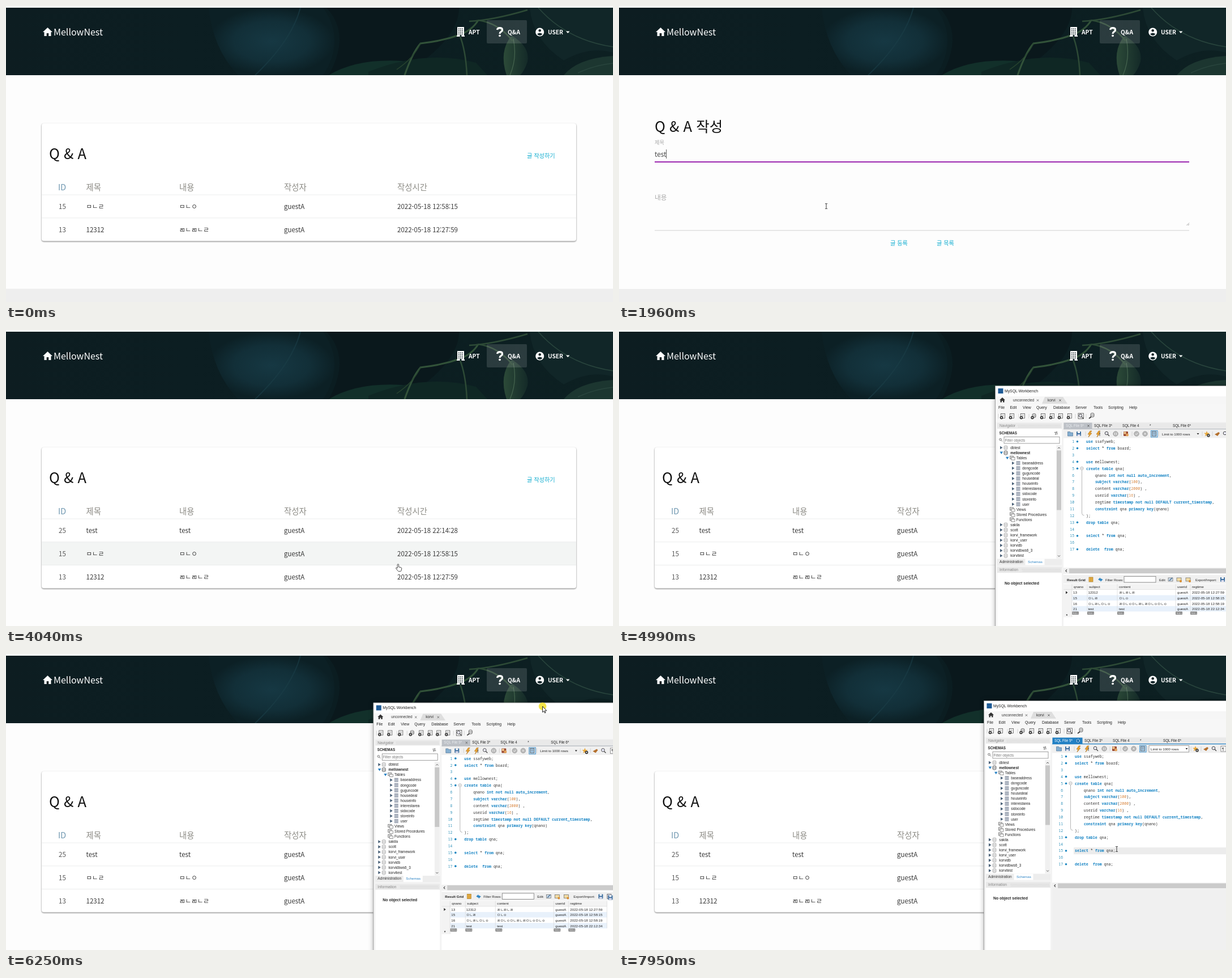
Write an HTML page that moves like this. It is 1072x522 px and loops after 8000 ms.

```html
<!DOCTYPE html>
<html lang="ko">
<head>
<meta charset="utf-8">
<title>Q &amp; A</title>
<style>
html, body { margin: 0; height: 100%; overflow: hidden; background: #fdfdfd; }
svg { display: block; width: 1072px; height: 522px; }
text { white-space: pre; font-family: "Noto Sans CJK KR", "Noto Sans CJK JP", "Noto Sans", sans-serif; }
#win text { font-family: "Liberation Sans", "Noto Sans CJK KR", sans-serif; }
#win .code { font-family: "Noto Sans Mono", "DejaVu Sans Mono", monospace; }
.code .k { fill: #1684c4; font-weight: 700; }
.code .n { fill: #d8843c; }
.m { font-weight: 500; }
.b { font-weight: 700; }
.card { filter: drop-shadow(0 1px 1.3px #0008); }
.frame { filter: drop-shadow(0 0 4px #0005); }
</style>
</head>
<body>
<svg id="stage" viewBox="0 0 1072 522"></svg>
<script>
const text = (x, y, str, size, fill = '#333', cls = '', more = '') =>
  `<text x="${x}" y="${y}" font-size="${size}" fill="${fill}" class="${cls}" ${more}>${str}</text>`;
const rect = (x, y, w, h, fill, more = '') =>
  `<rect x="${x}" y="${y}" width="${w}" height="${h}" fill="${fill}" ${more}/>`;
const path = (d, fill, more = '') => `<path d="${d}" fill="${fill}" ${more}/>`;
const line = (d, color, width = 1, more = '') => path(d, 'none', `stroke="${color}" stroke-width="${width}" ${more}`);
const disc = (x, y, r, fill, more = '') => `<circle cx="${x}" cy="${y}" r="${r}" fill="${fill}" ${more}/>`;
const group = (id, body) => `<g id="${id}">${body}</g>`;
const each = (list, fn) => list.map(fn).join('');

const USER = 'guestA';
const CYAN = '#14aed0';

/* ---------- page header ---------- */
const header = () => `
  <defs>
    <linearGradient id="dark"><stop stop-color="#0d1d21"/><stop offset=".3" stop-color="#0c1e22"/>
      <stop offset=".55" stop-color="#0b1d21"/><stop offset="1" stop-color="#0d2022"/></linearGradient>
    <radialGradient id="leaf"><stop stop-color="#163843"/><stop offset=".6" stop-color="#122f38"/>
      <stop offset="1" stop-color="#0c2025"/></radialGradient>
    <linearGradient id="blade" x2="1"><stop stop-color="#2c4a38"/><stop offset="1" stop-color="#142a28"/></linearGradient>
    <clipPath id="banner"><rect y="3" width="1072" height="119"/></clipPath>
  </defs>` +
  rect(0, 0, 1072, 3, '#f9fdfa') + rect(0, 3, 1072, 119, 'url(#dark)') +
  '<g clip-path="url(#banner)">' +
  path('M358 3Q365 75 410 122H560Q600 60 560 3Z', 'url(#leaf)') +
  line('M520 3Q505 60 440 122', '#1b3e48', 2, 'opacity=".6"') +
  path('M566 3Q610 50 570 122H700Q800 60 800 3Z', '#0a181c') +
  path('M570 122Q620 92 700 97L760 122Z', '#12302a') +
  path('M640 116Q740 76 830 100L850 122H640Z', '#0f2724') +
  path('M925 3Q930 60 985 96Q1030 70 1072 82V3Z', '#112628') +
  path('M985 122Q1010 92 1072 88V122Z', '#1c3630') +
  line('M940 3Q990 60 1072 72M1010 118Q1040 104 1072 101', '#29453d', 1.5) +
  path('M884 122Q870 80 893 52Q926 72 921 98Q916 114 908 122Z', 'url(#blade)') +
  line('M890 122Q903 92 896 58', '#476650', 1.2) +
  line('M704 122Q718 82 732 66Q770 62 801 51Q824 42 834 25', '#325239', 3) +
  line('M801 51Q812 78 814 122M818 27Q860 25 921 7M834 25Q870 30 895 62', '#2d4a36', 2.5) +
  line('M690 112Q720 92 732 66', '#28442f', 1.5) +
  '</g>' +
  rect(849, 25, 71, 41, '#fff', 'rx="2" opacity=".13"') +
  path('M73.500 38L65 46H67.500V53H71.700V48H75.300V53H79.500V46H82Z', '#fff') +
  text(84, 52, 'MellowNest', 16, '#fff') +
  path('M796 54V52H797V37H809V52H810V54Z', '#fff') +
  each([0, 1, 2, 3], r => each([799, 802, 805], x => rect(x, 39.5 + r * 3, 1.6, 1.6, '#14262a'))) +
  rect(801.500, 51, 3, 3, '#14262a') +
  line('M867.500 42Q868 38.600 872 38.600Q876.500 38.600 876.500 42Q876.500 44.200 874 45.600Q872 46.800 872 49', '#fff', 3.2) +
  disc(872, 52.300, 1.900, '#fff') +
  disc(942.700, 46, 7.500, '#fff') + disc(942.700, 43.300, 2.300, '#14262a') +
  path('M938 49.500Q942.700 45.500 947.400 49.500Q942.700 54.500 938 49.500Z', '#14262a') +
  text(817, 50, 'APT', 10.2, '#fff', 'b') + text(886, 50, 'Q&amp;A', 10.2, '#fff', 'b') +
  text(957, 50, 'USER', 10.2, '#fff', 'b') + path('M989 44.500H995.500L992.200 48Z', '#fff');

/* ---------- list page ---------- */
const COLS = [93, 141.5, 306, 491, 691];
const ROWS = [
  [25, 'test', 'test', USER, '2022-05-18 22:14:28'],
  [15, 'ㅁㄴㄹ', 'ㅁㄴㅇ', USER, '2022-05-18 12:58:15'],
  [13, '12312', 'ㄻㄴㄻㄴㄹ', USER, '2022-05-18 12:27:59']];
const rowY = i => 333 + 40.8 * i;

const list = (id, rows) => group(id,
  rect(0, rowY(rows.length) + 84, 1072, 130, '#eee') +
  rect(63, 207, 944, rowY(rows.length) - 207, '#fff', 'rx="4" class="card"') +
  rect(63, 0, 944, 40.8, '#f3f5f4', `id="${id}Hover"`) +
  text(76, 270, 'Q &amp; A', 25.5, '#111') + text(920, 267.5, '글 작성하기', 10.2, CYAN, 'm') +
  each(['ID', '제목', '내용', '작성자', '작성시간'], (s, i) =>
    text(COLS[i] - (i ? 0 : 1), 324.5, s, 14.4, i ? '#8c8b85' : '#6f97b0', '', 'font-weight="300"')) +
  each(rows, (r, i) => rect(63, rowY(i) - .5, 944, 1, '#ebeded') +
    each(r, (s, c) => text(COLS[c], rowY(i) + 25.3, s, 11.5, c ? '#383838' : '#555', '', 'font-weight="300"'))));

/* ---------- form page ---------- */
const form = () => group('form',
  text(63, 222, 'Q &amp; A 작성', 25.5, '#111') +
  text(63, 265, '제목', 11.7, '#aaa', '', 'id="label0"') + text(63, 265.5, '', 11.7, '#444', '', 'id="value0"') +
  rect(63, 274.8, 944, 1, '#cfcfcf') + rect(0, 274, 0, 2, '#9c27b0', 'id="bar0"') +
  text(63, 341.5, '내용', 11.7, '#aaa', '', 'id="label1"') + text(77, 344.5, '', 11.7, '#444', '', 'id="value1"') +
  group('lower', rect(0, 499, 1072, 60, '#eee') + rect(63, 395.3, 944, 1, '#d2d2d2') +
    rect(0, 394.8, 0, 2, '#4caf50', 'id="bar1"') +
    line('M1002.500 387L1007 382.500M1005 387L1007 385', '#888', .8) +
    text(479, 421.5, '글 등록', 10.2, CYAN, 'm') + text(561, 421.5, '글 목록', 10.2, CYAN, 'm')) +
  rect(0, 0, .8, 16, '#333', 'id="caret"'));

/* ---------- database window ---------- */
const BLUE = '#2a82c4';
const paper = (x, y, fill = '#fff') => rect(x - 3.5, y - 4.5, 7, 8, fill, 'stroke="#555" stroke-width=".8"') +
  line(`M${x - 2} ${y - 2}h4m-4 2h4`, '#888', .7);
const badge = (x, y) => disc(x, y, 2.700, '#222') + line(`M${x - 1.6} ${y}h3.200m-1.600-1.600v3.200`, '#fff', .8);
const lens = (x, y) => disc(x - 1, y - 1, 2.800, '#eef', 'stroke="#444"') + line(`M${x + 1} ${y + 1}l3 3`, '#444', 1.3);
const cross = (x, y) => line(`M${x - 1.7} ${y - 1.7}l3.400 3.400m0-3.400l-3.400 3.400`, '#555', .8);
const bolt = (x, y) => path(`M${x + 1} ${y - 5}l-4 6h3l-2 5 6-7h-3l3-4z`, '#f0a52a', 'stroke="#a66a18" stroke-width=".6"');
const drum = (x, y, c) => rect(x - 3, y - 3.5, 6, 7, '#eee', `rx="2" stroke="${c}" stroke-width=".8"`) +
  line(`M${x - 3} ${y - 1}h6m-6 2.300h6`, c, .6);
const floppy = (x, y) => rect(x - 4, y - 4, 8, 8, '#3e6f9f', 'rx="1"') + rect(x - 2, y - 4, 4, 3, '#fff') + rect(x - 2.5, y + 1, 5, 3, '#dde');
const header2 = (y, s) => rect(648, y, 114, 10, '#e9e9e9') +
  line(`M${652 + s.length * 3.6} ${y + 4}H760m0 3H${652 + s.length * 3.6}`, '#c6c6c6', 1, 'stroke-dasharray="1 1"') +
  text(652, y + 7.3, s, 6.6, '#888');

// depth, name, state: 1 closed, 2 open
const TREE = [[0, 'dbtest', 1], [0, 'mellownest', 2], [1, 'Tables', 2],
  ...'baseaddress dongcode guguncode housedeal houseinfo interestarea sidocode storeinfo user'.split(' ').map(s => [2, s, 1]),
  ...['Views', 'Stored Procedures', 'Functions'].map(s => [1, s, 0]),
  ...'sakila scott korvi_framework korvi_user korvidb korvidbws6_3 korvitest'.split(' ').map(s => [0, s, 1])];

const tree = () => each(TREE, ([depth, name, state], i) => {
  const x = 655 + depth * 10.5, y = 191.5 + i * 9.07;
  const icon = depth == 0 ? drum(x + 8, y, name == 'mellownest' ? '#555' : '#aaa') :
    depth == 1 ? rect(x + 5, y - 3.5, 6, 5, '#ddd', 'stroke="#666" stroke-width=".7"') + rect(x + 7.5, y - 1, 6, 4.5, '#fff', 'stroke="#666" stroke-width=".7"') :
    rect(x + 5.5, y - 3.5, 7, 7, '#9aa2b0') + line(`M${x + 5.5} ${y - 1}h7m-7 2.300h7`, '#e4e8ee', .7);
  const arrow = state == 1 ? path(`M${x - 2} ${y - 2.800}v5.600l4.500-2.800z`, '#4a6178') :
    state ? path(`M${x - 2.500} ${y - 2}h5.600l-2.800 4.500z`, BLUE) : '';
  return arrow + icon + text(x + 16.3, y + 2.3, name, 6.4, '#222', name == 'mellownest' ? 'b' : '');
});

const CODE = ['use ssafyweb;', 'select * from board;', '', 'use mellownest;', 'create table qna(',
  '    qnano int not null auto_increment,', '    subject varchar(100),', '    content varchar(2000) ,',
  '    userid varchar(16) ,', '    regtime timestamp not null DEFAULT current_timestamp,',
  '    constraint qna primary key(qnano)', ');', 'drop table qna;', '', 'select * from qna;', '', 'delete  from qna;'];
const KEYS = /\b(use|select|from|create|table|int|not|null|auto_increment|subject|varchar|timestamp|DEFAULT|current_timestamp|constraint|primary|key|drop|delete)\b|\d+/g;
const paint = s => s.replace(KEYS, m => `<tspan class="${/\d/.test(m) ? 'n' : 'k'}">${m}</tspan>`);
const code = () => each(CODE, (s, i) => {
  const y = 183.2 + i * 11.875;
  return text(784, y, i + 1, 6.4, '#2b8fb8', 'code', 'text-anchor="end"') + text(805, y, paint(s), 6.62, '#333', 'code') +
    (/^[a-z]/.test(s) ? disc(789.5, y - 2.5, 1.8, '#1a86c0') : '');
});

const GRID = [783, 810, 863, 966, 992];
const DATA = [
  ['13', '12312', 'ㄻㄴㄻㄴㄻ', USER, '2022-05-18 12:27:59'],
  ['15', 'ㅁㄴㄻ', 'ㅁㄴㅇ', USER, '2022-05-18 12:58:15'],
  ['16', 'ㅁㄴㄻㄴㅁㄴㅇ', 'ㄻㅁㄴㅇㅁㄴㄻㄴㄻㅁㄴㅇㅁㄴㅇ', USER, '2022-05-18 12:58:19'],
  ['21', 'test', 'test', USER, '2022-05-18 22:12:34']];
const results = () => group('results',
  rect(765, 414, 400, 200, '#fff') + rect(765, 416, 400, 15, '#f0f0f0') +
  text(771, 426.5, 'Result Grid', 6.1, '#222', 'b') + rect(810, 420, 7, 8, '#f4b84a', 'stroke="#a77a22" stroke-width=".7"') +
  line('M812.500 420v8m2.500-8v8', '#a77a22', .7) +
  path('M826 424l4-3.500v2h2v2h-2v2zM834.500 424l-4 4v-2h-1v-2h1v-2z', '#3388c4') +
  text(839, 426.5, 'Filter Rows:', 6, '#222') + rect(872, 418.5, 56, 10.5, '#fff', 'stroke="#777" stroke-width=".8"') +
  text(934, 426.5, 'Edit:', 6, '#222') +
  each([954, 969, 985], (x, i) => rect(x - 4, 421, 8, 6, i ? '#f2dca4' : '#cfdfed', 'stroke="#666" stroke-width=".7"') +
    (i ? disc(x + 3, 427, 2, '#d98b2b') : line(`M${x - 2} 426l5-5`, '#4a6f94', 1.4))) +
  text(998, 426.5, 'Export/Import:', 6, '#222') + floppy(1046, 424) + paper(1061, 424.5, '#dde') + floppy(1063, 426) +
  rect(765, 432, 292, 9.5, '#f3f3f3') + rect(765, 441.5, 15, 49, '#f3f3f3') +
  each(['qnano', 'subject', 'content', 'userid', 'regtime'], (s, i) => text(GRID[i], 439, s, 6.2, '#222')) +
  each(DATA, (r, i) => (i % 2 ? rect(780, 442 + i * 9.6, 277, 9.6, '#e8f1fb') : '') +
    each(r, (s, c) => text(GRID[c] - (c == 0 ? 1 : c == 1 ? 1.5 : 0), 449.3 + i * 9.6, s, 6.15, '#222'))) +
  each(GRID, x => rect(x - 3, 480.5, 12, 5.5, '#858585', 'rx="1"') + text(x - 1.5, 485, 'NULL', 4, '#fff')) +
  line('M765 441.500H1057M780 432V490M807 432V480M860 432V480M963 432V480M989 432V480M1057 432V480', '#d8d8d8', .7) +
  path('M769 444.500v5l3.500-2.500z', '#333') + text(769.5, 490, '*', 7, '#333', 'b'));

const win = () => group('win',
  rect(644.5, 82.5, 500, 500, '#f3f3f3', 'class="frame"') + rect(645, 83, 500, 31, '#fff') +
  rect(649.5, 87, 9, 9, '#1f5b96') + text(661, 94, 'MySQL Workbench', 6.85, '#222') +
  rect(645, 101, 500, 13, '#f6f6f6') + path('M727 114L732 102H764L772 114Z', '#dedede') +
  path('M657 103L652 107.500H653.500V111.500H656V109H658V111.500H660.500V107.500H662Z', '#333') +
  text(676, 110, 'unconnected', 6.5) + cross(719.5, 108) + text(737, 110, 'korvi', 6.5) + cross(759, 108) +
  rect(645, 114, 500, 32, '#f7f7f7') +
  each([['File', 650], ['Edit', 670.5], ['View', 693], ['Query', 717], ['Database', 747], ['Server', 786], ['Tools', 818],
    ['Scripting', 844], ['Help', 881]], ([s, x]) => text(x, 122.8, s, 6.9, '#222')) +
  each([658, 674, 693, 729, 745, 760, 776], x => paper(x, 136) + badge(x - 2.5, 138.5)) + drum(713, 135, '#555') + badge(710, 138.5) +
  rect(791, 131, 9.5, 9.5, '#fff', 'stroke="#444" stroke-width=".8"') + lens(796, 136) +
  drum(816, 134, '#555') + line('M810 140l4-3', '#333', 1.6) +
  line('M650 132v8M686 132v8M704 132v8M786 132v8M805 132v8', '#ccc', .8) +
  // sidebar
  rect(648, 148, 114, 240, '#fff') + header2(148, 'Navigator') + text(651.5, 168, 'SCHEMAS', 6.3, '#222', 'b') +
  line('M749 164.500h5l-1.500-1.500M755 167h-5l1.500 1.500', '#444', .9) + disc(653.5, 177, 1.800, 'none', 'stroke="#555" stroke-width=".8"') +
  line('M655 178.500l2 2', '#555', .9) + rect(660, 172.5, 98, 11.5, '#fff', 'stroke="#888" stroke-width=".8"') +
  text(661.5, 180.500, 'Filter objects', 6.3, '#777') + tree() +
  rect(752.5, 187, 9, 200, '#f0f0f0') + rect(753, 196.5, 8, 105, '#c8c8c8') +
  line('M755 193l2-2 2 2M755 381.500l2 2 2-2', '#555', 1) +
  rect(648, 387.5, 114, 11, '#ededed') + rect(697.5, 387.5, 34, 11, '#fff') +
  text(652, 394.8, 'Administration', 6.6, '#333') + text(702, 394.8, 'Schemas', 6.2, BLUE) +
  header2(402, 'Information') + rect(648, 412.5, 114, 200, '#fff') + text(661, 433, 'No object selected', 6.9, '#222', 'b') +
  // editor
  rect(765, 147.5, 400, 11, '#e9e9e9') + rect(765.5, 147.5, 50, 11, '#bcc0c6', 'id="tab"') + rect(765, 158, 400, 1.5, '#bcc0c6', 'id="rule"') +
  text(769, 155, 'SQL File 9*', 6.3, '#e8eaee', '', 'id="tabName"') + cross(809, 153) +
  group('tabs', each([['SQL File 3*', 819], ['SQL File 4', 869], ['*', 917], ['SQL File 6*', 958]], ([s, x]) => text(x, 155, s, 6.3, '#222'))) +
  group('busy', disc(810.7, 153, 4.500, '#1b6fb0') + disc(810.7, 153, 2.800, 'none', 'stroke="#b9dcf4" stroke-width="1.3" stroke-dasharray="2 1"')) +
  rect(765, 159.5, 400, 15, '#f0f0f0') +
  path('M772.500 163.500h4l1 1.500h4v6h-9z', '#84aed0', 'stroke="#54789a" stroke-width=".7"') + floppy(792, 167) +
  bolt(811, 167) + bolt(826, 167) + line('M829 164v7', '#555') + lens(842, 167) +
  each([857, 894, 909], x => disc(x, 167, 4.300, '#b8b8b8', 'stroke="#999" stroke-width=".7"')) +
  line('M855.500 165v4m3-4v4M892 167l1.500 1.800 2.800-3.500M907.500 165.500l3 3m0-3l-3 3', '#eee', 1) +
  rect(871, 163, 8, 8, '#9a4a34', 'rx="1"') + disc(873.5, 165.5, 2.200, '#f0c890') + disc(877.5, 169, 2.500, '#e2a15c') +
  rect(919.500, 161.500, 11.5, 11.5, '#cfe6f7', 'stroke="#3a8ac4" stroke-width=".9"') + paper(925, 167.5, '#9cc4e4') +
  rect(936, 161.5, 70.5, 11.5, '#fff', 'id="limit" stroke-width=".8"') + text(939, 169.5, 'Limit to 1000 rows', 6.1, '#222') +
  path('M1000.500 166h4l-2 2.500z', '#222') +
  path('M1018 162l1.300 3.500 3.700.2-3 2.300 1.200 3.600-3.200-2.100-3.200 2.100 1.200-3.600-3-2.300 3.700-.2z', '#e8a83a') + badge(1021, 170) +
  path('M1032 168l7-4 2 2-4 5z', '#b4702e') + lens(1051, 167) + rect(1063, 162.5, 9, 9.5, '#fff', 'stroke="#777" stroke-width=".8"') + text(1065, 170, '¶', 7, '#333') +
  line('M804 163v8M867 163v8M886 163v8M933 163v8M1010 163v8M1028 163v8', '#ccc', .8) +
  rect(765, 174.5, 400, 229, '#fff') + rect(803, 341.2, 400, 12, '#ececec', 'id="band"') + code() +
  disc(797.5, 228, 2.700, '#fff', 'stroke="#999" stroke-width=".7"') +
  line('M796 228h3M797.500 231V307Q797.500 311 801.500 311', '#999', .7) + rect(876, 341.5, .9, 11.5, '#222', 'id="ibar"') +
  rect(765, 403.5, 400, 10.5, '#f0f0f0') + rect(775, 404.5, 400, 8.5, '#cbcbcb') + line('M771 406.500l-2.200 2.200 2.200 2.200', '#444', 1.1) +
  rect(765, 414, 400, 200, '#f0f0f0') + results() + line('M644.500 600V82.500H1145', '#8f8f8f', .8));

/* ---------- pointer ---------- */
const pointer = () => group('pointer', disc(0, 0, 6.800, '#f2e02a', 'id="halo" opacity=".85"') +
  path('M0 0V10.500L2.400 8.300 4 11.800 5.500 11.100 4 7.700H7.300Z', '#fff', 'id="arrow" stroke="#111" stroke-width=".9"') +
  path('M-1.200 1.200Q-1.200 0 0 0 1.200 0 1.200 1.200V5l3.800.8q1.600.5 1.400 2l-.8 3.500q-.3 1.500-1.500 1.500H1.200q-1 0-1.800-1.200L-3.600 7.600q-.6-1 .4-1.400.8-.2 2 1z',
    '#fff', 'id="hand" stroke="#333" stroke-width=".9"') +
  line('M-2-4.500h1.300l.7.600.7-.6H2M0-4V4M-2 4.500h1.300l.7-.6.7.6H2', '#222', .9, 'id="beam"'));

const stage = document.getElementById('stage');
stage.innerHTML = header() + list('before', ROWS.slice(1)) + list('after', ROWS) + form() + win() + pointer();

const el = {};
stage.querySelectorAll('[id]').forEach(e => el[e.id] = e);
const set = (id, attrs) => { for (const k in attrs) el[id].setAttribute(k, attrs[k]); };
const show = (id, on) => set(id, { display: on ? 'inline' : 'none' });
const move = (id, x, y) => set(id, { transform: `translate(${x} ${y})` });
const ramp = (t, from, ms) => { const p = Math.min(1, Math.max(0, (t - from) / ms)); return p * p * (3 - 2 * p); };

// time, x, y of the pointer tip
const TRACK = [[0, 1090, 330], [110, 1090, 330], [120, 1036, 318], [400, 950, 268], [910, 946, 266], [1200, 420, 262],
  [1500, 400, 270], [1750, 372, 335], [1960, 366, 353], [2380, 366, 353], [2790, 519, 446], [2930, 521, 448], [3100, 505, 438],
  [3420, 503, 437], [3830, 660, 425], [4040, 692, 413], [4300, 800, 390], [4520, 1002, 322], [4590, 1100, 300],
  [5120, 1100, 118], [5190, 1060, 118], [5260, 1030, 118], [5400, 1030, 118], [5800, 961, 104], [6110, 961, 103],
  [6320, 941, 87], [6400, 941, 90], [6730, 907, 311], [6940, 888, 336], [7140, 879, 344], [8000, 879, 344]];
const tip = t => {
  const i = TRACK.findIndex(k => k[0] > t), a = TRACK[i - 1], b = TRACK[i], p = (t - a[0]) / (b[0] - a[0]);
  return [a[1] + (b[1] - a[1]) * p, a[2] + (b[2] - a[2]) * p];
};

const FOCUS = [1200, 2170];
const TYPED = [[1470, 1590, 1680, 1820], [2310, 2400, 2500, 2650]];
const LABEL = [[265, 244], [341.5, 325]];

function drawForm(t) {
  const grow = t >= FOCUS[1] ? 16.5 : 0;
  move('lower', 0, grow);
  FOCUS.forEach((at, i) => {
    const p = ramp(t, at, 200), active = i || t < FOCUS[1] ? p : 1 - ramp(t, FOCUS[1], 200);
    set('label' + i, { y: LABEL[i][0] + (LABEL[i][1] - LABEL[i][0]) * p, 'font-size': 11.7 - 2.5 * p });
    set('bar' + i, { x: 535 - 472 * active, width: 944 * active });
    el['value' + i].textContent = 'test'.slice(0, TYPED[i].filter(k => k <= t).length);
  });
  const i = t < FOCUS[1] ? 0 : 1, start = [63, 77][i];
  set('caret', { x: start + el['value' + i].getComputedTextLength(), y: [253, 332.5][i] });
  show('caret', t >= FOCUS[0]);
}

function draw(t) {
  const [x, y] = tip(t);
  const onForm = t >= 800 && t < 3430, open = t >= 4990, active = t >= 7140, busy = t >= 7950;
  show('before', t < 800);
  show('after', t >= 3430);
  show('form', onForm);
  show('win', open);
  if (onForm) drawForm(t);

  const row = Math.floor((y - 333) / 40.8), onRow = !onForm && !open && x < 1007 && row >= 0 && row < 3;
  show('beforeHover', false);
  show('afterHover', onRow);
  set('afterHover', { y: rowY(row) });

  const drag = ramp(t, 6090, 230);
  move('win', 20 * (1 - drag), 16 * (1 - drag));
  set('tab', { fill: active ? '#2180c4' : '#bcc0c6', width: busy ? 53 : 50 });
  set('rule', { fill: active ? '#2180c4' : '#bcc0c6' });
  set('tabName', { fill: active ? '#fff' : '#e8eaee' });
  set('limit', { fill: active ? '#fff' : '#f0f0f0', stroke: active ? '#888' : 'none' });
  move('tabs', busy ? 3 : 0, 0);
  show('band', active);
  show('ibar', active && t < 7620);
  show('busy', busy);
  show('results', !busy);

  const beam = onForm ? y < 400 : open && y > 174;
  const hand = !beam && (onForm || onRow || (!open && x < 980 && y < 280));
  show('beam', beam);
  show('hand', hand);
  show('arrow', !beam && !hand);
  show('halo', t >= 5900 && t < 6340);
  move('pointer', x, y);
}

const begin = performance.now();
(function frame() {
  draw((performance.now() - begin) % 8000);
  requestAnimationFrame(frame);
})();
</script>
</body>
</html>
```
